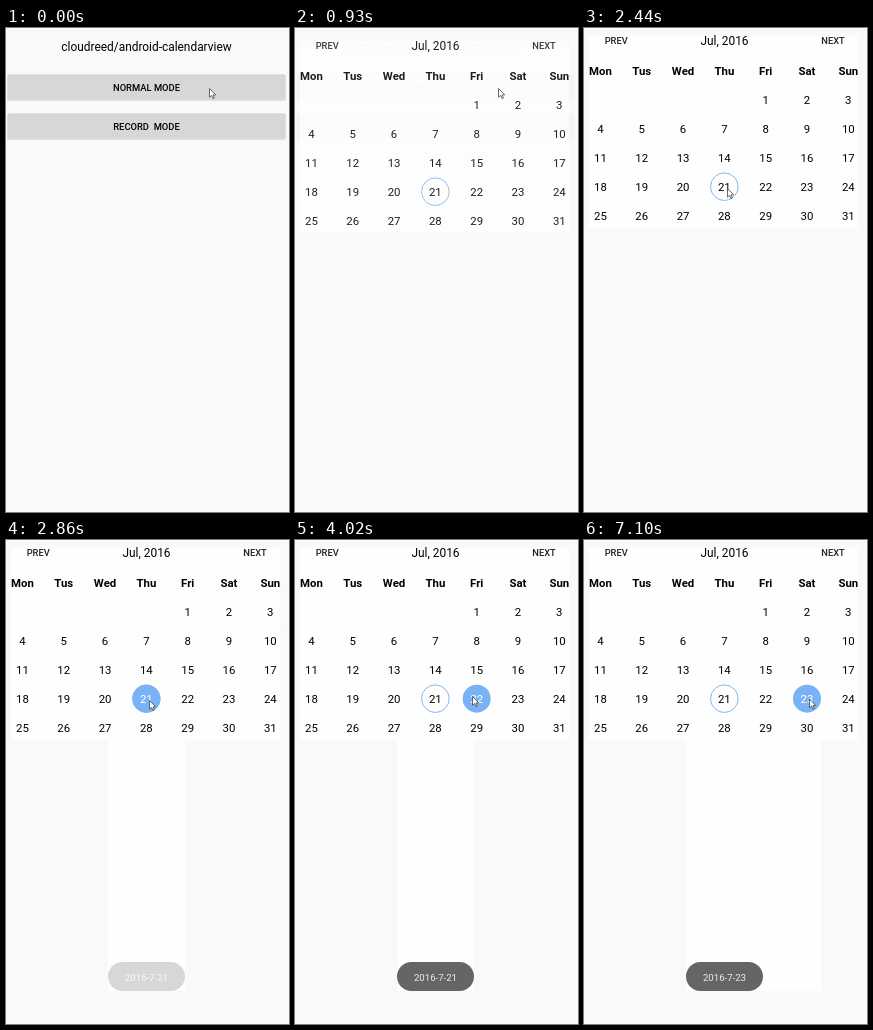
An HTML page for the animation above (8 s loop, 283 by 484 pixels).

```html
<!DOCTYPE html>
<html lang="en">
<head>
<meta charset="utf-8">
<title>Calendar demo</title>
<style>
  html, body { margin: 0; width: 100%; height: 100%; overflow: hidden; background: #f9f9f9; }
  svg { display: block; width: 100%; height: 100%; }
  text { font: 11.4px Roboto, sans-serif; text-anchor: middle; fill: #000; }
  .title { font-size: 11.9px; }
  .button { font-size: 9.4px; font-weight: 500; }
  .small { font-size: 9.3px; font-weight: 500; fill: #222; }
  .head { font-weight: 700; }
  .picked { fill: #fff; }
  .key { fill: #d6d7d7; }
  .shade { opacity: .1; }
  #note { font-size: 9.6px; fill: #eee; }
</style>
</head>
<body>
<svg viewBox="0 0 283 484">
  <g id="menu">
    <text class="title" x="140.5" y="22.5">cloudreed/android-calendarview</text>
    <rect class="shade" x="1" y="46.5" width="279" height="26.5" rx="2"/>
    <rect class="key" x="2" y="46.5" width="277" height="25" rx="1"/>
    <rect id="ripple" x="2" y="46.5" width="277" height="25" rx="1"/>
    <text class="button" x="140.5" y="62.8">NORMAL MODE</text>
    <rect class="shade" x="1" y="85.5" width="279" height="26.5" rx="2"/>
    <rect class="key" x="2" y="85.5" width="277" height="25" rx="1"/>
    <text class="button" x="140.5" y="101.8">RECORD&#160;&#160;MODE</text>
  </g>
  <g id="calendar">
    <rect x="5" y="8" width="269" height="192" fill="#fefefe"/>
    <text class="small" x="32.2" y="16.3">PREV</text>
    <text class="title" x="140.5" y="17">Jul, 2016</text>
    <text class="small" x="249" y="16.3">NEXT</text>
    <circle id="today" r="13.8" fill="none" stroke="#82b8f4"/>
    <circle id="mark" r="14" fill="#79b3f6"/>
    <g id="grid"></g>
  </g>
  <rect id="patch" x="102" y="200" height="251" fill="#fefefe"/>
  <g id="toast">
    <rect x="102" y="422" width="77" height="29" rx="14.5" fill="#656565"/>
    <text id="note" x="140.5" y="440.5"></text>
  </g>
  <path id="cursor" d="M.5 .5V9.2L2.5 7.4L4 10.6L5.4 10L4 6.9H6.7Z" fill="#fff" stroke="#444" stroke-width=".8"/>
</svg>
<script>
const $ = id => document.getElementById(id);
const set = (el, attrs) => { for (const k in attrs) el.setAttribute(k, attrs[k]); };
const colX = col => 16.4 + col * 41.32;
const rowY = row => 43.2 + row * 28.95;
const LOOP = 8000, TICK = 130;
const cells = [];

function addText(label, col, row, cls = "") {
  const el = document.createElementNS("http://www.w3.org/2000/svg", "text");
  el.textContent = label;
  set(el, { x: colX(col), y: rowY(row) + 4, class: cls });
  $("grid").append(el);
  return el;
}

// July 2016 starts on a Friday
const place = day => [(day + 3) % 7, 1 + Math.floor((day + 3) / 7)];
const moveTo = (el, day) => {
  const [col, row] = place(day);
  set(el, { cx: colX(col), cy: rowY(row) - .3 });
};

"Mon Tus Wed Thu Fri Sat Sun".split(" ").forEach((name, col) => addText(name, col, 0, "head"));
for (let day = 1; day <= 31; day++) cells[day] = addText(day, ...place(day));
moveTo($("today"), 21);

// Progress from 0 to 1 in count equal jumps, the first one at start
const steps = (t, start, count) =>
  Math.max(0, Math.min(1, (Math.floor((t - start) / TICK) + 1) / count));
const passed = (t, ...times) => times.filter(at => t >= at).length;

function cursorAt(t) {
  const first = steps(t, 2050, 4), second = steps(t, 3440, 3), third = steps(t, 4420, 4);
  return [
    203 - 60 * first + 34 * second + 48 * third,
    60 + 100 * first - 4 * second + 2.5 * third
  ];
}

function draw(now) {
  const t = now % LOOP;
  const opened = steps(t, 930, 2);
  const fade = (1 - opened) ** 3;
  const picked = 20 + passed(t, 2740, 4020, 4840);
  const noted = 21 + passed(t, 4570, 6700);
  const shown = steps(t, 2740, 4);

  set($("ripple"), { opacity: t >= 500 && t < 780 ? .07 : 0 });
  set($("menu"), { opacity: fade });
  set($("calendar"), { opacity: 1 - fade, transform: `translate(0 ${10 * (1 - opened)})` });
  set($("mark"), { opacity: picked > 20 ? 1 : 0 });
  moveTo($("mark"), picked);
  for (let day = 21; day <= 23; day++) set(cells[day], { class: day === picked ? "picked" : "" });
  set($("patch"), { width: noted > 21 ? 135 : 77, opacity: shown ? 1 : 0 });
  set($("toast"), { opacity: shown });
  $("note").textContent = "2016-7-" + noted;
  set($("cursor"), { transform: `translate(${cursorAt(t)})` });
  requestAnimationFrame(draw);
}
draw(performance.now());
</script>
</body>
</html>
```
